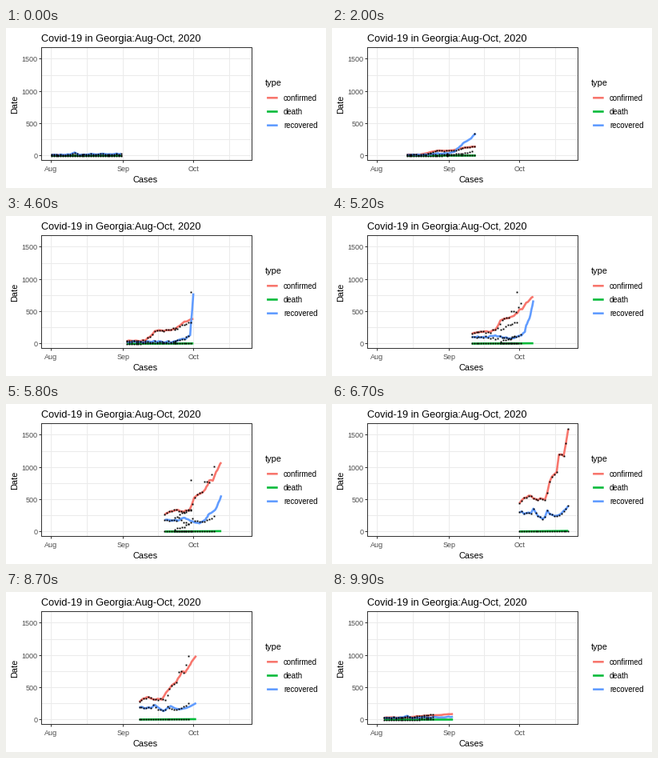
These frames come from a looping animation (400 px wide and 200 px high, 10000 ms). A matplotlib script:

```python
import numpy as np
import matplotlib.pyplot as plt
from matplotlib.animation import FuncAnimation

W, H, DPI = 400, 200, 100
N_FRAMES, INTERVAL = 100, 100
PATH_POINTS = 50
COLORS = {"confirmed": "#F8766D", "death": "#00BA38", "recovered": "#619CFF"}
GREY, GRID, LABEL = "#333333", "#EBEBEB", "#4D4D4D"
LEFT, RIGHT, TOP, BOTTOM = 44, 307, 24, 165
THICK = 2.6

plt.rcParams["font.family"] = "Liberation Sans"
rng = np.random.default_rng(8)


def px(pixels):
    """Length in pixels to typographic points."""
    return pixels * 72 / DPI


def x_pos(day):
    return 56.2 + 2.91 * np.asarray(day)


def y_pos(cases):
    return 159.1 - 0.08045 * np.asarray(cases)


# ---- daily counts: a trend through key points plus noise -----------------
def trend(n, keys, noise=0):
    days = np.arange(n)
    jitter = noise * rng.uniform(-1.5, 1.5, n)
    jitter[[0, -1]] = 0
    return np.rint(np.maximum(np.interp(days, *zip(*keys)) + jitter, 0))


def month(start, n, **series):
    days = start + np.arange(n)
    return {kind: np.column_stack([days, trend(n, *args)])
            for kind, args in series.items()}


MONTHS = [
    month(0, 31,
          confirmed=([(0, 9), (30, 13)], 3),
          death=([(0, 0), (30, 1)],),
          recovered=([(0, 14), (8, 16), (10, 50), (12, 18), (30, 28)], 5)),
    month(31, 30,
          confirmed=([(0, 20), (8, 25), (12, 168), (21, 180), (25, 290),
                      (29, 327)], 7),
          death=([(0, 0), (29, 3)],),
          recovered=([(0, 15), (21, 20), (26, 75), (28, 130), (29, 800)], 9)),
    month(61, 22,
          confirmed=([(0, 440), (4, 560), (7, 490), (11, 500), (14, 880),
                      (16, 950), (17, 1180), (19, 1200), (21, 1595)], 18),
          death=([(0, 4), (21, 12)],),
          recovered=([(0, 300), (3, 270), (6, 335), (10, 215), (12, 300),
                      (16, 220), (21, 400)], 22)),
]


def densify(path, total=PATH_POINTS):
    """Add points to a path by always splitting its longest pieces."""
    lengths = np.hypot(*np.diff(path, axis=0).T)
    parts = np.ones(len(lengths), int)
    for _ in range(total - len(path)):
        parts[np.argmax(lengths / parts)] += 1
    out = [a + (b - a) * k / n
           for a, b, n in zip(path[:-1], path[1:], parts) for k in range(n)]
    return np.array(out + [path[-1]])


DENSE = [{k: densify(p) for k, p in m.items()} for m in MONTHS]

# (last still frame, first frame of the next month, from, to)
MOVES = [(11, 33, 0, 1), (45, 67, 1, 2), (79, 100, 2, 0)]


def state(frame):
    """Month shown, next month and progress between the two."""
    for start, end, a, b in MOVES:
        if frame <= start:
            return a, a, 0.0
        if frame < end:
            return a, b, (frame - start) / (end - start)
    return 0, 0, 0.0


def shape(frame, kind):
    a, b, t = state(frame)
    src, dst = MONTHS[a][kind], MONTHS[b][kind]
    if a == b:
        return src, src
    line = DENSE[a][kind] * (1 - t) + DENSE[b][kind] * t
    n = min(len(src), len(dst))
    dots = src[:n] * (1 - t) + dst[:n] * t
    # days without a partner wait in place until the move is over
    return line, np.vstack([dots, src[n:]])


# ---- static parts: whole coordinates are pixel centres -------------------
fig = plt.figure(figsize=(W / DPI, H / DPI), dpi=DPI, facecolor="white")
ax = fig.add_axes([0, 0, 1, 1])
ax.set_xlim(-0.5, W - 0.5)
ax.set_ylim(H - 0.5, -0.5)
ax.axis("off")


def stroke(xs, ys, color, width=1, z=1, cap="butt"):
    return ax.plot(xs, ys, color=color, lw=px(width), zorder=z, snap=False,
                   solid_capstyle=cap, solid_joinstyle="round")[0]


def text(x, y, s, size, color="black", **kw):
    ax.text(x - 0.5, y - 0.5, s, fontsize=px(size), color=color,
            **{"va": "baseline", **kw})


for day in (0, 15.5, 31, 46, 61, 76.5):
    stroke([np.rint(x_pos(day))] * 2, [TOP, BOTTOM], GRID)
for cases in range(0, 1501, 250):
    stroke([LEFT, RIGHT], [np.rint(y_pos(cases))] * 2, GRID)

for day, name in ((0, "Aug"), (31, "Sep"), (61, "Oct")):
    x = np.rint(x_pos(day))
    stroke([x, x], [BOTTOM, BOTTOM + 3], GREY, z=5)
    text(x + 0.5, 179, name, 9, LABEL, ha="center")
for cases in range(0, 1501, 500):
    y = np.rint(y_pos(cases))
    stroke([LEFT - 3, LEFT], [y, y], GREY, z=5)
    text(39.5, y + 4, str(cases), 9, LABEL, ha="right")
stroke([LEFT, RIGHT, RIGHT, LEFT, LEFT], [TOP, TOP, BOTTOM, BOTTOM, TOP],
       GREY, z=5, cap="projecting")

text(43.5, 17, "Covid-19 in Georgia:Aug-Oct, 2020", 12.8)
text(174.5, 193, "Cases", 11, ha="center")
text(16.5, 95.5, "Date", 11, ha="right", va="center", rotation=90)
text(324, 72, "type", 11)
for i, (kind, color) in enumerate(COLORS.items()):
    y = 86.8 + 17.2 * i
    stroke([325.6, 339.2], [y, y], color, THICK)
    text(347, y + 4.2, kind, 9.6)

# ---- moving parts --------------------------------------------------------
lines = {k: stroke([], [], c, THICK, 2) for k, c in COLORS.items()}
dots, = ax.plot([], [], "s", color="black", ms=px(1.9), mew=0, zorder=3)


def draw(frame):
    marks = []
    for kind, line in lines.items():
        path, pts = shape(frame, kind)
        line.set_data(x_pos(path[:, 0]), y_pos(path[:, 1]))
        marks.append(pts)
    marks = np.vstack(marks)
    dots.set_data(x_pos(marks[:, 0]), y_pos(marks[:, 1]))
    return [*lines.values(), dots]


anim = FuncAnimation(fig, draw, frames=N_FRAMES, interval=INTERVAL,
                     repeat=True, repeat_delay=0, blit=False)
plt.show()
```
